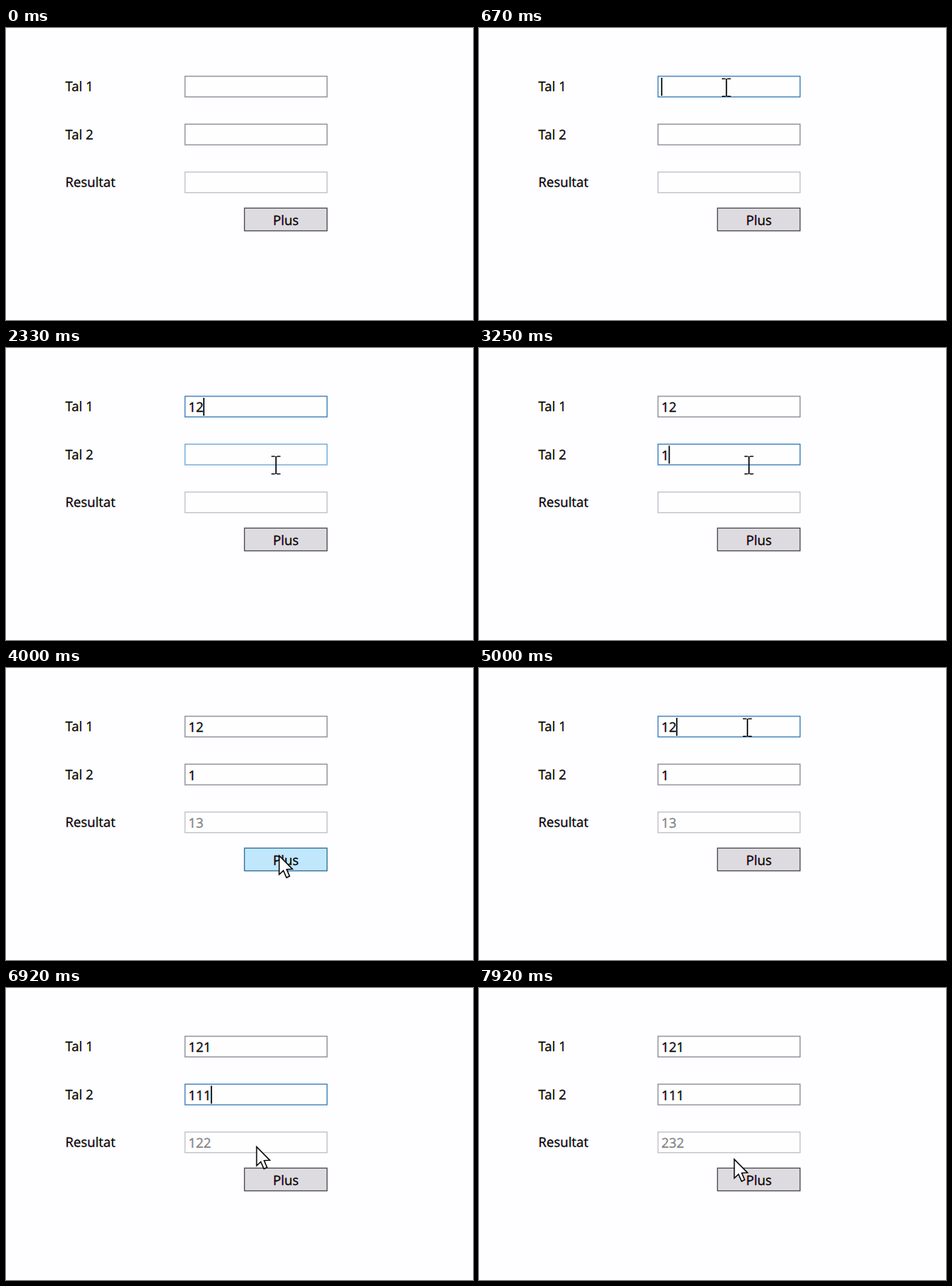
These frames come from a looping animation (600x375 px, 8 s). An HTML page with a canvas:

```html
<!DOCTYPE html>
<html lang="da">
<head>
<meta charset="utf-8">
<title>Plus</title>
<style>
html, body { margin: 0; width: 100%; height: 100%; overflow: hidden; background: #fefdff; }
canvas { display: block; width: 600px; height: 375px; }
</style>
</head>
<body>
<canvas id="stage" width="600" height="375"></canvas>
<script>
const ctx = document.getElementById('stage').getContext('2d');
const LOOP = 8000, TICKS = 96; // twelve ticks per second
const SPEED = 28;              // pointer pixels per tick
const BLINK = 6.4;             // ticks the caret stays on or off
const RESULT = 2, BUTTON = 3;

const field = row => ({ x: 230, y: 62 + 61.5 * row, w: 182.5, h: 26.5 });
const BOXES = [field(0), field(1), field(2), { x: 306.4, y: 231.3, w: 106.1, h: 29.2 }];
const LABELS = ['Tal 1', 'Tal 2', 'Resultat'];

// What the user does: where the pointer arrives, when it clicks, what is typed.
const start = { at: 2, x: 320, y: 94 };
const moves = [];
const events = [];
const move = (at, x, y) => moves.push({ at, x, y });
const click = at => events.push({ at });
const type = (at, key) => events.push({ at, key });

move(6, 318, 76);
click(6);
move(16, 333, 152);
type(22, '1');
type(26, '2');
move(28, 347, 150);
click(31);
type(33, '1');
move(43, 351, 241);
click(44);
move(55, 345, 76);
click(55);
type(62, '1');
move(71, 340, 246);
click(72);
move(76, 316, 138);
click(76);
type(78, '1');
type(80, '1');
move(83, 322, 204);
move(85, 339, 236);
click(88);
move(95, 328, 220);

const smooth = u => u * u * (3 - 2 * u);

function pointerAt(n) {
  if (n < start.at) return null;
  let { x, y } = start;
  for (const to of moves) {
    const ticks = Math.ceil(Math.hypot(to.x - x, to.y - y) / SPEED);
    const u = smooth(Math.min(1, Math.max(0, 1 - (to.at - n) / ticks)));
    x += (to.x - x) * u;
    y += (to.y - y) * u;
    if (u < 1) break;
  }
  return { x, y };
}

const targetAt = p => p
  ? BOXES.findIndex(b => p.x >= b.x && p.x <= b.x + b.w && p.y >= b.y && p.y <= b.y + b.h)
  : -1;

// Replays the clicks and keys up to tick n.
function stateAt(n) {
  const state = { values: ['', '', ''], focus: -1, since: 0, pressed: false };
  for (const { at, key } of events) {
    if (at > n) break;
    state.since = at;
    if (key) {
      state.values[state.focus] += key;
      continue;
    }
    const target = targetAt(pointerAt(at));
    state.focus = target < RESULT ? target : -1;
    if (target !== BUTTON) continue;
    state.pressed = n === at;
    if (n > at) state.values[RESULT] = String(+state.values[0] + +state.values[1]);
  }
  return state;
}

// Three inks, slightly apart, give subpixel colour fringes.
function text(str, x, y, alpha = 1) {
  ctx.save();
  ctx.globalCompositeOperation = 'multiply';
  ctx.globalAlpha = alpha;
  ctx.lineWidth = 0.3;
  ['#ff0', '#f0f', '#0ff'].forEach((ink, i) => {
    const shifted = x + (i - 1) * 0.4;
    ctx.fillStyle = ctx.strokeStyle = ink;
    ctx.fillText(str, shifted, y);
    ctx.strokeText(str, shifted, y);
  });
  ctx.restore();
}

function drawBox({ x, y, w, h }, fill, border) {
  ctx.fillStyle = fill;
  ctx.fillRect(x, y, w, h);
  ctx.strokeStyle = border;
  ctx.lineWidth = 1.3;
  ctx.strokeRect(x, y, w, h);
}

function drawField(i, state, hover, n) {
  const box = BOXES[i], value = state.values[i];
  const readOnly = i === RESULT, focused = state.focus === i;
  const border = readOnly ? '#c0c0c9' : focused ? '#3d7fb9' : hover ? '#6fa8d6' : '#8b8f97';
  text(LABELS[i], 76.2, box.y + 19);
  drawBox(box, '#fefeff', border);
  text(value, 234.3, box.y + 20, readOnly ? 0.46 : 1);
  if (focused && Math.floor((n - state.since) / BLINK) % 2 === 0) {
    ctx.fillStyle = '#000';
    ctx.fillRect(233.9 + ctx.measureText(value).width, box.y + 2, 1.6, 23);
  }
}

function drawButton(pressed, hover) {
  const [fill, border] = pressed ? ['#c4e5f6', '#2c628b']
    : hover ? ['#c0e7fc', '#35749b'] : ['#dddbdf', '#4f5054'];
  drawBox(BOXES[BUTTON], fill, border);
  text('Plus', 343, 253);
}

function drawArrow({ x, y }) {
  const outline = [[0, 0], [0, 24.2], [5.4, 19.2], [9.4, 28.2], [13.4, 26.4], [9.6, 17.6], [17, 17.2]];
  ctx.beginPath();
  outline.forEach(([dx, dy]) => ctx.lineTo(x + dx, y + dy));
  ctx.closePath();
  ctx.fillStyle = '#fff';
  ctx.fill();
  ctx.strokeStyle = '#000';
  ctx.lineWidth = 1.4;
  ctx.stroke();
}

function drawBeam({ x, y }) {
  ctx.fillStyle = '#111';
  ctx.fillRect(x - 1, y - 11, 1.7, 23);
  for (const dy of [-11.5, 11]) {
    ctx.fillRect(x - 6, y + dy, 4.6, 1.4);
    ctx.fillRect(x + 1, y + dy, 4.6, 1.4);
  }
}

function draw(ms) {
  // The small lead absorbs frame times rounded down to 10 ms.
  const n = Math.floor((ms + 6) % LOOP / LOOP * TICKS);
  const pointer = pointerAt(n), hovered = targetAt(pointer), state = stateAt(n);
  ctx.fillStyle = '#fefdff';
  ctx.fillRect(0, 0, 600, 375);
  ctx.font = '17px "Open Sans", "Noto Sans", sans-serif';
  ctx.textRendering = 'geometricPrecision';
  LABELS.forEach((_, i) => drawField(i, state, hovered === i, n));
  drawButton(state.pressed, hovered === BUTTON);
  if (!pointer) return;
  const editing = hovered >= 0 && hovered < RESULT;
  (editing ? drawBeam : drawArrow)(pointer);
}

let began;
function loop(now) {
  began ??= now;
  draw(now - began);
  requestAnimationFrame(loop);
}
draw(0);
requestAnimationFrame(loop);
</script>
</body>
</html>
```
